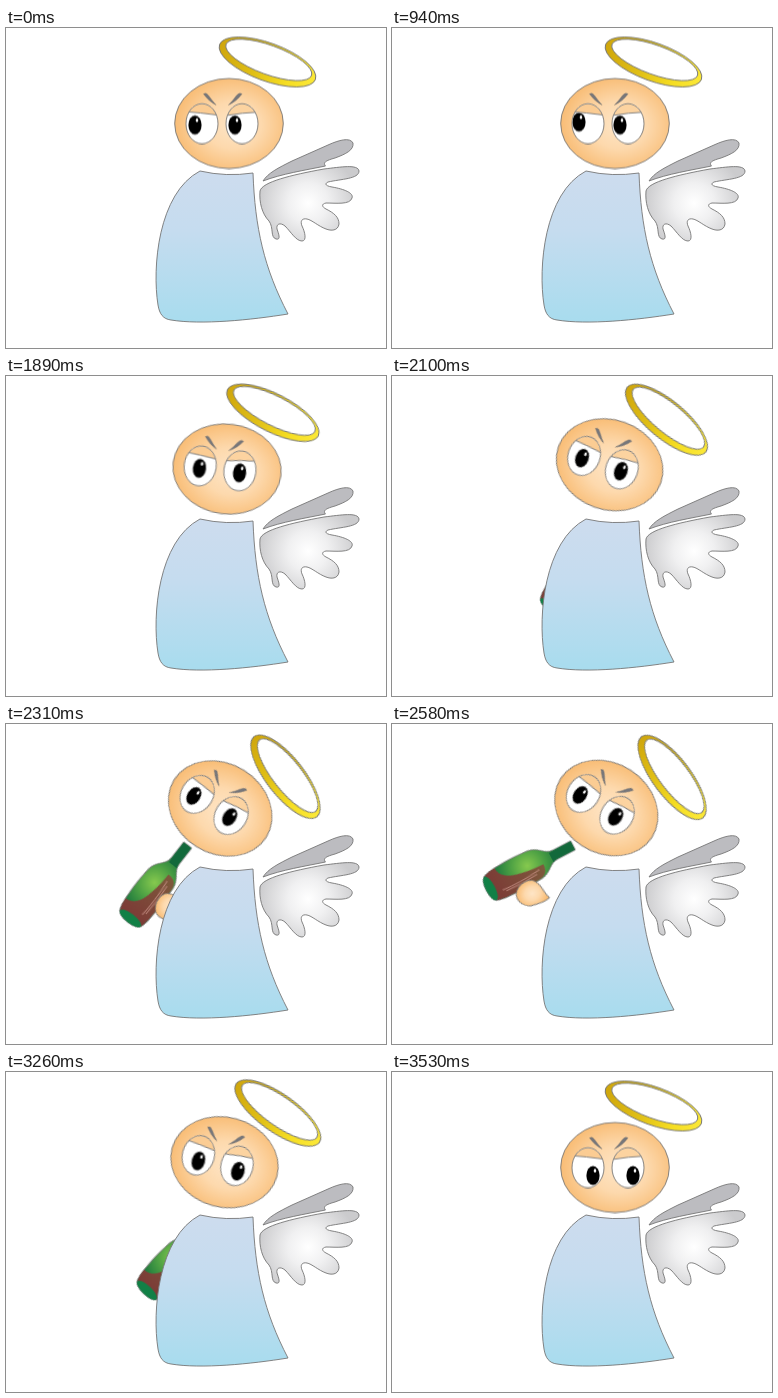
These frames come from a looping animation (380x320 px, 4090 ms). An HTML page:

```html
<!DOCTYPE html>
<html lang="en">
<head>
<meta charset="utf-8">
<title>Angel with a bottle</title>
<style>
html, body { margin: 0; width: 100%; height: 100%; overflow: hidden; background: #fff; }
svg { display: block; width: 100vw; height: 100vh; }
.line { stroke: #777; stroke-width: .9; stroke-linejoin: round; }
.head, .bottle, .pupil { animation: 4090ms linear infinite; }
.head { animation-name: head; }
.bottle { animation-name: bottle; }
.pupil.l { animation-name: look-l; }
.pupil.r { animation-name: look-r; }

/* Each moving segment advances in 30 ms steps, the first one at its start. */
@keyframes head {
  0% { transform: translate(223px, 95.5px) rotate(0deg); }
  44.0098% { transform: translate(223px, 95.5px) rotate(0deg); animation-timing-function: steps(18, jump-start); }
  57.2127% { transform: translate(214.2px, 84.5px) rotate(32deg); animation-timing-function: steps(9, jump-start); }
  63.8142% { transform: translate(214.3px, 84px) rotate(33deg); animation-timing-function: steps(8, jump-start); }
  69.6822% { transform: translate(214px, 85px) rotate(30.5deg); }
  73.8386% { transform: translate(214px, 85px) rotate(30.5deg); animation-timing-function: steps(18, jump-start); }
  87.0416%, 100% { transform: translate(223px, 95.5px) rotate(0deg); }
}
@keyframes bottle {
  0% { transform: translate(212px, 291px) rotate(-58deg); }
  44.0098% { transform: translate(212px, 291px) rotate(-58deg); animation-timing-function: steps(18, jump-start); }
  57.2127% { transform: translate(122px, 197.5px) rotate(-52deg); animation-timing-function: steps(9, jump-start); }
  63.8142% { transform: translate(95px, 166.3px) rotate(-27.6deg); animation-timing-function: steps(8, jump-start); }
  69.6822% { transform: translate(103.5px, 180.5px) rotate(-37deg); }
  73.8386% { transform: translate(103.5px, 180.5px) rotate(-37deg); animation-timing-function: steps(3, jump-start); }
  76.0391% { transform: translate(103.7px, 182px) rotate(-38.7deg); animation-timing-function: steps(15, jump-start); }
  87.0416%, 100% { transform: translate(190px, 280px) rotate(-58deg); }
}
@keyframes look-l {
  0% { transform: translate(-34px, 1.5px); }
  .7335% { transform: translate(-34px, 1.5px); animation-timing-function: steps(10, jump-start); }
  8.0685% { transform: translate(-18px, 1.5px); }
  16.3814% { transform: translate(-18px, 1.5px); animation-timing-function: steps(10, jump-start); }
  23.7164% { transform: translate(-36px, -1.5px); }
  32.0293% { transform: translate(-36px, -1.5px); animation-timing-function: steps(5, jump-start); }
  35.6968% { transform: translate(-27px, 2.5px); }
  44.0098% { transform: translate(-27px, 2.5px); animation-timing-function: steps(18, jump-start); }
  57.2127% { transform: translate(-29px, 3.2px); }
  73.8386% { transform: translate(-29px, 3.2px); animation-timing-function: steps(18, jump-start); }
  87.0416%, 100% { transform: translate(-22px, 8px); }
}
@keyframes look-r {
  0% { transform: translate(6px, 1.5px); }
  .7335% { transform: translate(6px, 1.5px); animation-timing-function: steps(10, jump-start); }
  8.0685% { transform: translate(21.5px, 1.5px); }
  16.3814% { transform: translate(21.5px, 1.5px); animation-timing-function: steps(10, jump-start); }
  23.7164% { transform: translate(5px, 1.5px); }
  32.0293% { transform: translate(5px, 1.5px); animation-timing-function: steps(5, jump-start); }
  35.6968% { transform: translate(13px, 2.2px); }
  44.0098% { transform: translate(13px, 2.2px); animation-timing-function: steps(18, jump-start); }
  57.2127% { transform: translate(12.6px, 2.2px); }
  73.8386% { transform: translate(12.6px, 2.2px); animation-timing-function: steps(18, jump-start); }
  87.0416%, 100% { transform: translate(18px, 8px); }
}
</style>
</head>
<body>
<svg viewBox="0 0 380 320">
  <defs>
    <radialGradient id="skin" cx=".54" cy=".52" r=".58">
      <stop offset="0" stop-color="#fee5c6"/><stop offset=".45" stop-color="#fdd9ad"/><stop offset="1" stop-color="#f8b96e"/>
    </radialGradient>
    <linearGradient id="robe" x2="0" y2="1">
      <stop offset="0" stop-color="#cddcee"/><stop offset=".4" stop-color="#c5dcef"/><stop offset="1" stop-color="#a8dcee"/>
    </linearGradient>
    <radialGradient id="feather" gradientUnits="userSpaceOnUse" cx="302" cy="175" r="50">
      <stop offset="0" stop-color="#fff"/><stop offset=".4" stop-color="#f0f0f1"/><stop offset="1" stop-color="#cbcbcd"/>
    </radialGradient>
    <linearGradient id="gold">
      <stop offset="0" stop-color="#cfa60c"/><stop offset=".4" stop-color="#e0bf16"/>
      <stop offset=".75" stop-color="#f6de22"/><stop offset="1" stop-color="#fbe838"/>
    </linearGradient>
    <radialGradient id="glass" gradientUnits="userSpaceOnUse" cx="47" cy="-3" r="36">
      <stop offset="0" stop-color="#86c94e"/><stop offset=".45" stop-color="#4fa244"/><stop offset="1" stop-color="#14703c"/>
    </radialGradient>
    <linearGradient id="tag" x2="1" y2="0">
      <stop offset="0" stop-color="#7c3a36"/><stop offset="1" stop-color="#7d5a3c"/>
    </linearGradient>
    <clipPath id="behind"><path d="M0 0H245V286H0Z"/></clipPath>
    <clipPath id="eye-l"><ellipse cx="-27" cy=".2" rx="16" ry="20"/></clipPath>
    <clipPath id="eye-r"><ellipse cx="13" cy=".2" rx="16" ry="20"/></clipPath>
    <g id="pupil">
      <ellipse rx="6.6" ry="9.5"/>
      <ellipse cx="2" cy="-4.8" rx="1.2" ry="1.9" fill="#fff"/>
    </g>
  </defs>

  <g class="line">
    <path fill="#bcbcc0" d="M257 153C262 145 272 140 286 133L322 117C333 112 344 109 347 115C348 122 340 126 329 130C322 132 316 134 319.500 138C300 142 275 146 257 153Z"/>
    <path fill="url(#feather)" d="M254 163C256 154 285 147 318 141C335 139 352 136 353 143C353 151 335 151 322 154C318 156 320 158 326 159C338 161 348 165 346 170C344 177 330 175 320 175C315 176 316 179 320 181C328 185 333 189 333 196C332 203 325 203 320 201C312 198 306 192 301 191C296 190 294 193 296 198C299 204 301 213 296 213C290 213 285 204 279 198C274 194 270 196 271 201C273 207 275 212 270 211C264 209 268 200 263 193C256 186 253 174 254 163Z"/>
  </g>

  <g clip-path="url(#behind)">
    <g class="bottle">
      <path fill="url(#glass)" class="line" d="M3 -13C9 -17 36 -18 55 -16C66 -14 68 -5 77 -5H97V5H77C68 5 66 13 55 15C40 16 12 17 3 13C-2 9 -2 -9 3 -13Z"/>
      <path fill="#12693b" d="M72 -4.2Q75 -4.6 77 -4.6H96.6V4.6H77Q75 4.6 72 6Z"/>
      <path fill="url(#tag)" d="M4 -13Q9 -16 17 -16C17 -4 30 2 62 3C62 9 60 13 54 14.5C40 15.500 12 16.500 4 13Z"/>
      <path fill="none" stroke="#c9948a" stroke-width=".8" d="M14 7Q32 9 56 6M17 9.500Q34 11 52 9"/>
      <ellipse cx="4" rx="4.600" ry="13" fill="#118046"/>
      <path fill="url(#skin)" class="line" d="M52 35.500C46 37 40 36 31 34C22 29 20 18 28 13C35 8 45 10 47 15C51 21 49 28 52 35.500Z"/>
    </g>
  </g>

  <path class="line" fill="url(#robe)" d="M194 143Q220 149 247 145C249 200 258 240 282 286C245 292 195 297 165 292C157 291 153.500 286 152 277C146 240 152 165 194 143Z"/>

  <g class="head">
    <path class="line" fill="url(#gold)" fill-rule="evenodd" transform="translate(38.5 -61.5) rotate(20)"
      d="M-51 0A51 19 0 1 1 51 0A51 19 0 1 1 -51 0ZM-45 -2.4A45.5 14.6 0 1 0 46 -2.4A45.5 14.6 0 1 0 -45 -2.4Z"/>
    <ellipse class="line" rx="54.3" ry="45" fill="url(#skin)"/>
    <g clip-path="url(#eye-l)">
      <path fill="#fff" d="M-45 -22H-8V22H-45Z"/>
      <g class="pupil l"><use href="#pupil"/></g>
      <path class="line" fill="#fbcc93" d="M-46 -12Q-30 -11 -8 -8V-24H-46Z"/>
    </g>
    <g clip-path="url(#eye-r)">
      <path fill="#fff" d="M-5 -22H32V22H-5Z"/>
      <g class="pupil r"><use href="#pupil"/></g>
      <path class="line" fill="#fcd3a0" d="M-6 -7.5Q14 -11 32 -11.5V-24H-6Z"/>
    </g>
    <g class="line" fill="none">
      <ellipse cx="-27" cy=".2" rx="16" ry="20"/>
      <ellipse cx="13" cy=".2" rx="16" ry="20"/>
    </g>
    <g fill="#77777b" stroke="#666" stroke-width=".4">
      <path d="M-25.5 -29.5Q-23 -31.5 -20.5 -28Q-17 -23 -13 -18.5Q-20 -22 -25.5 -29.5Z"/>
      <path d="M13 -29.5Q10.5 -31.5 7.5 -28Q4 -23 -.5 -18.5Q7.5 -22 13 -29.5Z"/>
    </g>
  </g>
</svg>
</body>
</html>
```
